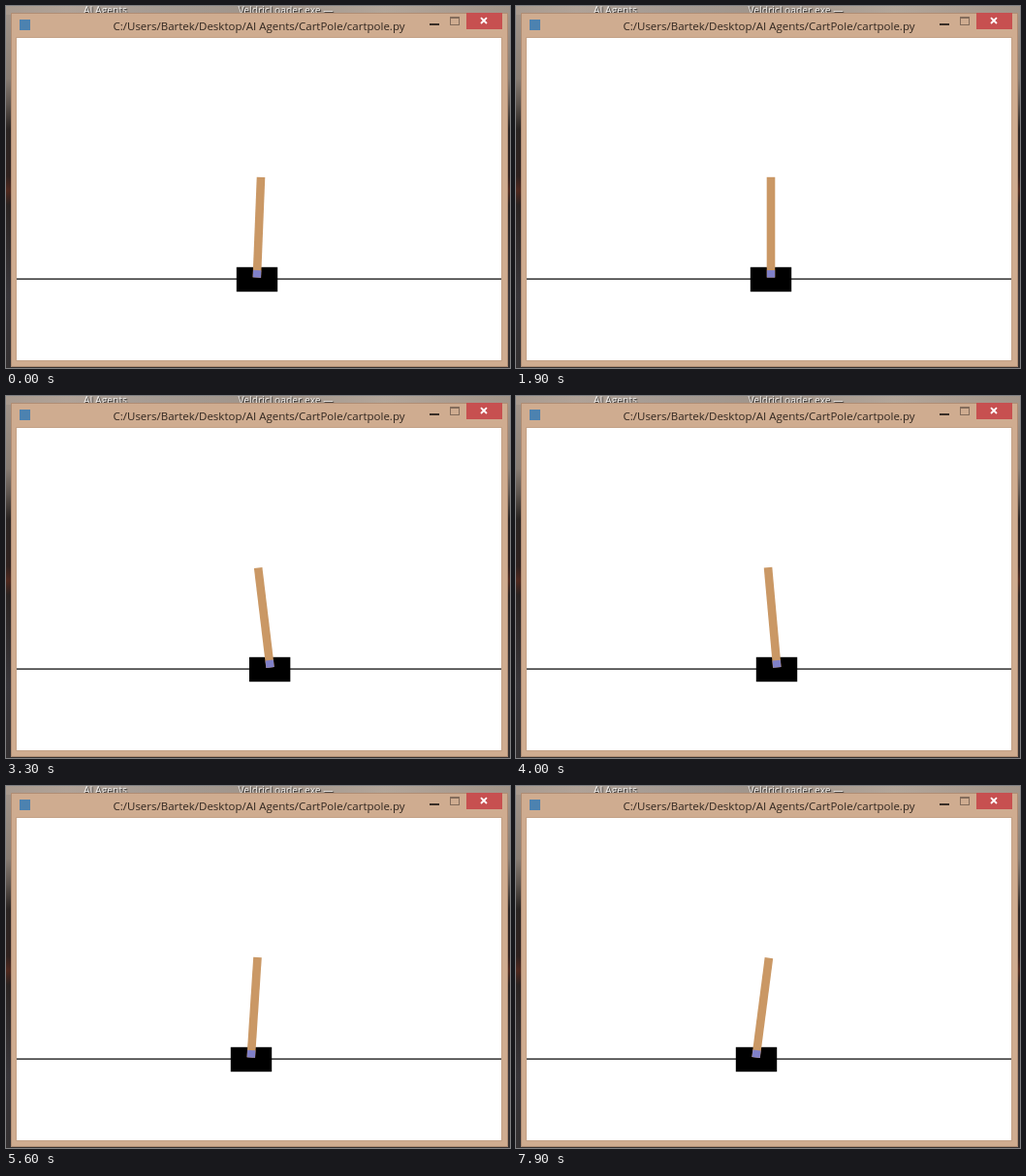
An HTML page that plays this animation: 520 by 374 pixels, repeating every 8 s.

```html
<!DOCTYPE html>
<html lang="en">
<head>
<meta charset="utf-8">
<title>Cart and pole</title>
<style>
  html, body { margin: 0; width: 100%; height: 100%; overflow: hidden; background: #302b28; }
  svg { display: block; width: 520px; height: 374px; }
  text { font-family: "Open Sans", "Noto Sans", sans-serif; }
  .crisp { shape-rendering: crispEdges; }
  .label { font-size: 10.3px; fill: #f4f1ee; text-anchor: middle; text-shadow: 1px 1px 1px #222; }
</style>
</head>
<body>
<svg viewBox="0 0 520 374">
  <defs>
    <linearGradient id="top">
      <stop offset="0" stop-color="#a99b8f"/>
      <stop offset=".12" stop-color="#b0a297"/>
      <stop offset=".3" stop-color="#a59b93"/>
      <stop offset=".5" stop-color="#a0948a"/>
      <stop offset=".75" stop-color="#b2a599"/>
      <stop offset="1" stop-color="#a39589"/>
    </linearGradient>
    <linearGradient id="side" x2="0" y2="1">
      <stop offset="0" stop-color="#a4978c"/>
      <stop offset=".2" stop-color="#887d74"/>
      <stop offset=".27" stop-color="#5f5650"/>
      <stop offset=".34" stop-color="#2b2523"/>
      <stop offset=".47" stop-color="#30221f"/>
      <stop offset=".51" stop-color="#512a1f"/>
      <stop offset=".55" stop-color="#2b2422"/>
      <stop offset=".8" stop-color="#39363a"/>
      <stop offset="1" stop-color="#343031"/>
    </linearGradient>
  </defs>

  <!-- Desktop behind the window -->
  <rect width="520" height="374" fill="url(#side)"/>
  <rect width="520" height="9" fill="url(#top)"/>
  <text class="label" x="102.5" y="7.5">AI Agents</text>
  <text class="label" x="288.5" y="7.5">VeldricLoader.exe —</text>

  <!-- Window -->
  <g class="crisp">
    <rect x="5" y="7" width="513" height="366" fill="#b08d74"/>
    <rect x="6" y="8" width="511" height="364" fill="#cfac90"/>
    <rect x="10" y="32" width="502" height="335" fill="#c4a186"/>
    <rect x="11" y="33" width="500" height="333" fill="#fff"/>
    <rect x="14" y="14" width="11" height="11" fill="#4c82b0"/>
    <rect x="437" y="18" width="10" height="2" fill="#3a2f28"/>
    <path d="M458 12H468M458.5 12V20M467.5 12V20M458 19.5H468" stroke="#836c5b"/>
    <rect x="458" y="11" width="10" height="2" fill="#836c5b"/>
    <rect x="475" y="7" width="37" height="17" fill="#c75050"/>
  </g>
  <path d="M490 12.2L496 18M496 12.2L490 18" stroke="#fff" stroke-width="1.8"/>
  <text x="261" y="24.6" font-size="11.5" fill="#30261f" text-anchor="middle">C:/Users/Bartek/Desktop/AI Agents/CartPole/cartpole.py</text>

  <!-- Simulation -->
  <rect x="11" y="281.4" width="500" height="1.3" fill="#111"/>
  <g id="cart">
    <rect x="-21.2" y="269.8" width="42.4" height="25.4" fill="#000"/>
    <g id="pole">
      <rect x="-4.3" y="176.8" width="8.6" height="103.7" fill="#ca9865"/>
      <rect x="-4.1" y="273" width="8.2" height="7.5" fill="#8080c8"/>
    </g>
  </g>
</svg>
<script>
  const LOOP = 8000, STEP = 100, PIVOT = 277, LENGTH = 100;
  // time, cart centre, pole tip
  const keys = [
    [0, 259, 263], [1900, 263, 263], [2700, 272, 260.5], [4000, 269, 260],
    [5600, 253, 259.5], [6700, 257, 253], [7900, 248, 261]
  ];
  const cart = document.getElementById("cart");
  const pole = document.getElementById("pole");

  function slope(i, k) {
    const a = keys[Math.max(i - 1, 0)], b = keys[Math.min(i + 1, keys.length - 1)];
    return (b[k] - a[k]) / (b[0] - a[0]);
  }

  // Cubic Hermite curve through the keys
  function sample(t, k) {
    let i = 0;
    while (i < keys.length - 2 && t >= keys[i + 1][0]) i++;
    const a = keys[i], b = keys[i + 1], d = b[0] - a[0];
    const u = (t - a[0]) / d, v = 1 - u;
    return v * v * (1 + 2 * u) * a[k] + u * u * (3 - 2 * u) * b[k]
      + d * u * v * (v * slope(i, k) - u * slope(i + 1, k));
  }

  function draw(now) {
    const t = Math.floor((now % LOOP) / STEP) * STEP;
    const x = sample(t, 1), tip = sample(t, 2);
    const angle = Math.atan2(tip - x, LENGTH) * 180 / Math.PI;
    cart.setAttribute("transform", `translate(${x.toFixed(2)} 0)`);
    pole.setAttribute("transform", `rotate(${angle.toFixed(2)} 0 ${PIVOT})`);
  }

  const start = performance.now();
  function tick() {
    draw(performance.now() - start);
    requestAnimationFrame(tick);
  }
  tick();
</script>
</body>
</html>
```
